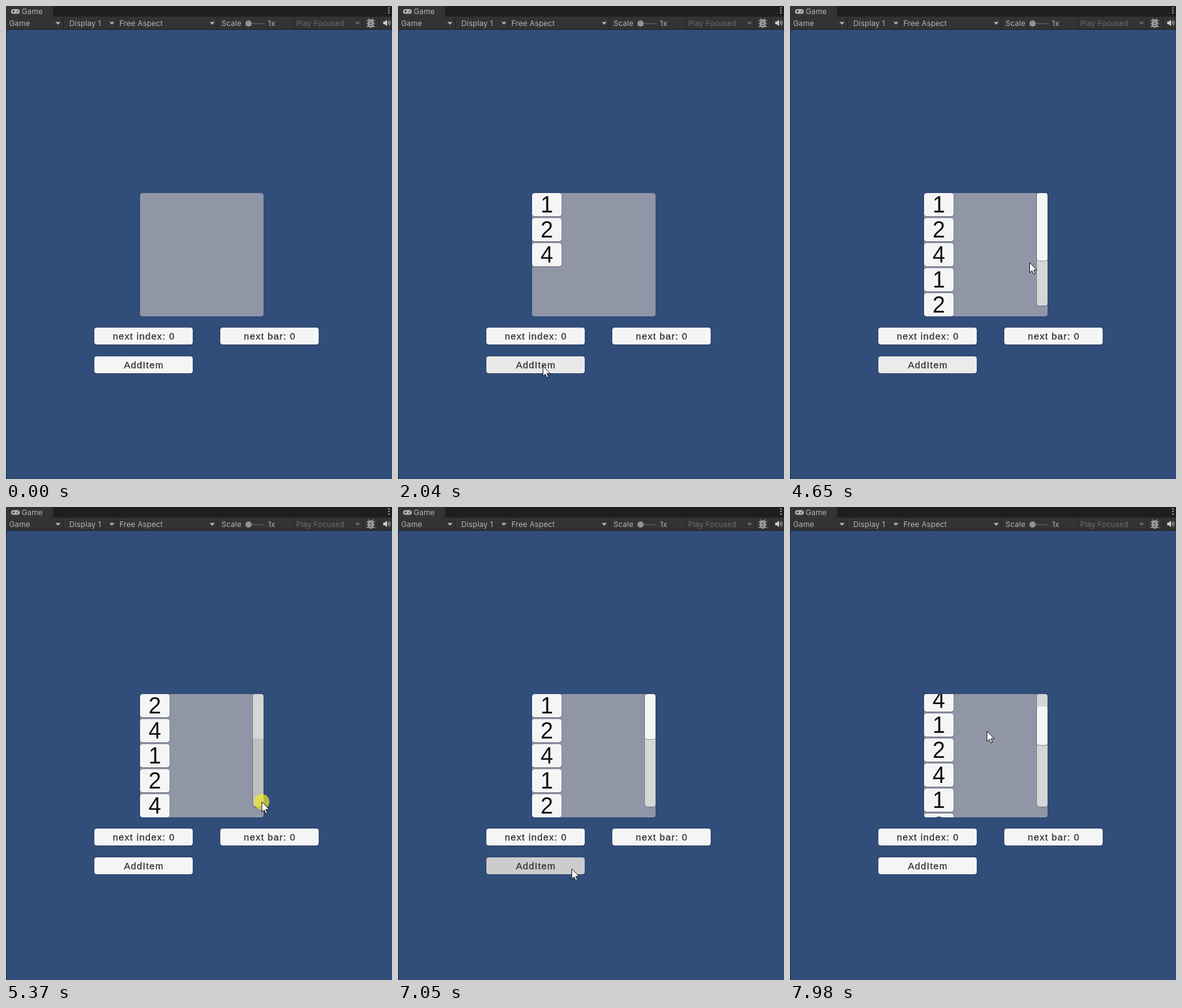
Recreate the animation shown at these times as an HTML page with a canvas. Size 616 px wide and 756 px high, loop 8 s.

```html
<!DOCTYPE html>
<html lang="en">
<head>
<meta charset="utf-8">
<title>Scroll list demo</title>
<style>
  html, body { margin: 0; width: 100%; height: 100%; overflow: hidden; background: #314d79; }
  canvas { display: block; }
</style>
</head>
<body>
<canvas id="stage" width="616" height="756"></canvas>
<script>
const ctx = document.getElementById('stage').getContext('2d');
const LOOP = 8000;
const UI = '12px Inter, Roboto, sans-serif';
const SANS = '"Liberation Sans", Arial, sans-serif';
const INK = '#b4b4b4', DIM = '#6c6c6c';
const LIST = { x: 214, y: 299, w: 197, h: 197 };
const BAR = { x: 394, y: 299, w: 17, h: 180 };
const PITCH = 40;

// Pointer trips; each one starts where the previous one ended
const trips = [
  { from: 800, to: 1130, x: 125, y: 410 },
  { from: 1130, to: 1460, x: 231, y: 575 },
  { from: 4140, to: 4650, x: 382, y: 410 },
  { from: 4650, to: 4860, x: 403, y: 369 },
  { from: 5010, to: 5370, x: 408, y: 471 },
  { from: 5520, to: 6000, x: 409, y: 369 },
  { from: 6010, to: 6600, x: 277, y: 578 },
  { from: 7350, to: 7620, x: 306, y: 447 },
  { from: 7680, to: 7950, x: 314, y: 358 }
];
const clicks = [[1765, 1945], [3455, 3640], [6860, 7022], [7200, 7320]];
const barDrag = [5010, 6010], listDrag = [7640, 7920];
const presses = [...clicks, barDrag, listDrag].sort((a, b) => a[0] - b[0]);

const clamp = (v, a, b) => Math.min(b, Math.max(a, v));
const mix = (a, b, k) => a + (b - a) * k;
const easeOut = k => 1 - (1 - k) ** 1.5;
const held = ([a, b], t) => t >= a && t < b;
const pressure = ([a, b], t) => clamp((t - a) / 100, 0, 1) * (1 - clamp((t - b) / 100, 0, 1));
const grey = v => `rgb(${v},${v},${v})`;

function pointerAt(t) {
  if (t < 800) {
    const k = (t - 30) / 60;
    return { x: mix(463, 56, k), y: mix(750, 692, easeOut(clamp(k, 0, 1))) };
  }
  let p = { x: 1, y: 189 };
  for (const trip of trips) {
    if (t < trip.from) break;
    const k = easeOut(clamp((t - trip.from) / (trip.to - trip.from), 0, 1));
    p = { x: mix(p.x, trip.x, k), y: mix(p.y, trip.y, k) };
  }
  return p;
}

function tint(spans, base, t) {
  return grey(Math.round(mix(base, 192, Math.max(...spans.map(s => pressure(s, t))))));
}

function rect(x, y, w, h, color) {
  ctx.fillStyle = color;
  ctx.fillRect(x, y, w, h);
}

function round(x, y, w, h, r, color) {
  ctx.fillStyle = color;
  ctx.beginPath();
  ctx.roundRect(x, y, w, h, r);
  ctx.fill();
}

function text(s, x, y, font, color, spacing = 0) {
  ctx.font = font;
  ctx.letterSpacing = spacing + 'px';
  ctx.fillStyle = color;
  ctx.fillText(s, x, y);
}

function trace(points, ox = 0, oy = 0) {
  ctx.beginPath();
  points.forEach(([x, y]) => ctx.lineTo(x + ox, y + oy));
  ctx.closePath();
}

function poly(points, color) {
  trace(points);
  ctx.fillStyle = color;
  ctx.fill();
}

function dot(x, y, r, color) {
  ctx.fillStyle = color;
  ctx.beginPath();
  ctx.arc(x, y, r, 0, 7);
  ctx.fill();
}

function line(x1, y1, x2, y2) {
  ctx.beginPath();
  ctx.moveTo(x1, y1);
  ctx.lineTo(x2, y2);
  ctx.stroke();
}

function panel(x, y, w, h, color) {
  round(x - 0.4, y - 0.2, w + 0.8, h + 1, 4, 'rgba(35,38,50,0.45)');
  round(x, y, w, h, 4, color);
}

function gamepad() {
  round(8, 5, 14, 7.5, 3.7, INK);
  rect(10, 8, 4, 1.2, '#333');
  rect(11.4, 6.6, 1.2, 4, '#333');
  dot(17, 9.6, 0.9, '#333');
  dot(19, 7.8, 0.9, '#333');
}

function bug() {
  ctx.strokeStyle = '#a8a8a8';
  ctx.lineWidth = 1.4;
  for (const s of [-1, 1]) {
    for (const d of [-1, 0, 1]) line(582, 28 + d * 3, 582 + s * 6.5, 28 + d * 5);
    line(582 + s * 2, 23, 582 + s * 3.5, 20);
  }
  round(577.5, 21.5, 9, 13, 4.5, '#a8a8a8');
  for (const y of [25, 28, 31]) rect(579.5, y, 5, 1, '#333');
}

function speaker() {
  poly([[602, 25], [604, 25], [608, 22], [608, 32], [604, 29], [602, 29]], '#d0d0d0');
  ctx.strokeStyle = '#b8b8b8';
  ctx.lineWidth = 1.1;
  for (const r of [3, 5.5]) {
    ctx.beginPath();
    ctx.arc(607.5, 27, r, -0.85, 0.85);
    ctx.stroke();
  }
}

function menu(label, x, arrowX, color = INK) {
  text(label, x, 32, UI, color, 0.1);
  if (arrowX) poly([[arrowX, 25.5], [arrowX + 8, 25.5], [arrowX + 4, 30]], color);
}

function toolbar() {
  rect(0, 0, 616, 38, '#1f1f1f');
  rect(0, 0, 75, 17, '#333');
  rect(0, 17, 616, 20, '#333');
  for (const x of [91, 177, 337, 459, 569, 595]) rect(x, 17, 1, 20, '#222');
  gamepad();
  text('Game', 25, 13, UI, INK, 0.1);
  menu('Game', 5, 79);
  menu('Display 1', 101, 165);
  menu('Free Aspect', 181, 325);
  menu('Scale', 344);
  menu('1x', 418);
  menu('Play Focused', 463, 557, DIM);
  rect(390, 27.5, 22, 1.2, '#626262');
  dot(387, 28, 5, '#939393');
  bug();
  speaker();
  for (const y of [2, 6, 10]) rect(610, y, 2, 2, INK);
}

function button(label, x, y, color) {
  panel(x, y, 157, 27, color);
  ctx.textAlign = 'center';
  text(label, x + 79, y + 19, '15.1px ' + SANS, '#323232', 1.05);
  ctx.strokeStyle = '#323232';
  ctx.lineWidth = 0.3;
  ctx.strokeText(label, x + 79, y + 19);
  ctx.textAlign = 'left';
}

function list(count, scroll) {
  round(LIST.x, LIST.y, LIST.w, LIST.h, 4, '#9196a6');
  ctx.save();
  ctx.beginPath();
  ctx.roundRect(LIST.x, LIST.y, LIST.w, LIST.h, 4);
  ctx.clip();
  ctx.textAlign = 'center';
  for (let i = 0; i < count; i++) {
    const y = LIST.y + i * PITCH - scroll;
    panel(LIST.x, y, 47, 37, '#f5f5f5');
    text(2 ** (i % 3), LIST.x + 23.5, y + 31, '36px ' + SANS, '#101010');
  }
  ctx.restore();
}

function scrollbar(top, size, color) {
  panel(BAR.x, BAR.y, BAR.w, BAR.h, '#d6d6d6');
  panel(BAR.x, BAR.y + top, BAR.w, size, color);
}

function arrow({ x, y }) {
  trace([[0, 0], [0, 16.5], [3.8, 13], [6.4, 18.7], [8.9, 17.6], [6.4, 12], [11.6, 12]], x + 0.3, y + 0.3);
  ctx.fillStyle = '#fff';
  ctx.fill();
  ctx.strokeStyle = '#111';
  ctx.lineWidth = 1;
  ctx.stroke();
}

function draw(t) {
  const tip = pointerAt(t);
  const count = 3 * clicks.filter(c => t >= c[1]).length;
  const last = presses.filter(p => t >= p[0]).pop();
  const selected = clicks.includes(last);

  let top = 0, scroll = 0;
  if (held(barDrag, t)) {
    top = clamp(tip.y - 369, 0, 72);
    scroll = top * PITCH / 72;
  } else if (t >= listDrag[0]) {
    // The content trails the pointer by one step
    scroll = 447 - pointerAt(Math.max(t - 30, 7620)).y;
    top = scroll * 0.22;
  }

  rect(0, 0, 616, 756, '#314d79');
  rect(0, 38, 1, 718, '#1c2430');
  toolbar();
  list(count, scroll);
  if (count > 5) scrollbar(top, Math.max(62, 648 / count), tint([barDrag], 245, t));
  button('next index: 0', 141, 514, grey(245));
  button('next bar: 0', 342, 514, grey(245));
  button('AddItem', 141, 560, tint(clicks, selected ? 235 : 245, t));

  if (presses.some(p => held(p, t))) dot(tip.x, tip.y, 12.3, 'rgba(238,233,40,0.7)');
  if ((t >= 30 && t < 120) || t >= 800) arrow(tip);
}

function tick() {
  draw(performance.now() % LOOP);
  requestAnimationFrame(tick);
}
tick();
</script>
</body>
</html>
```
